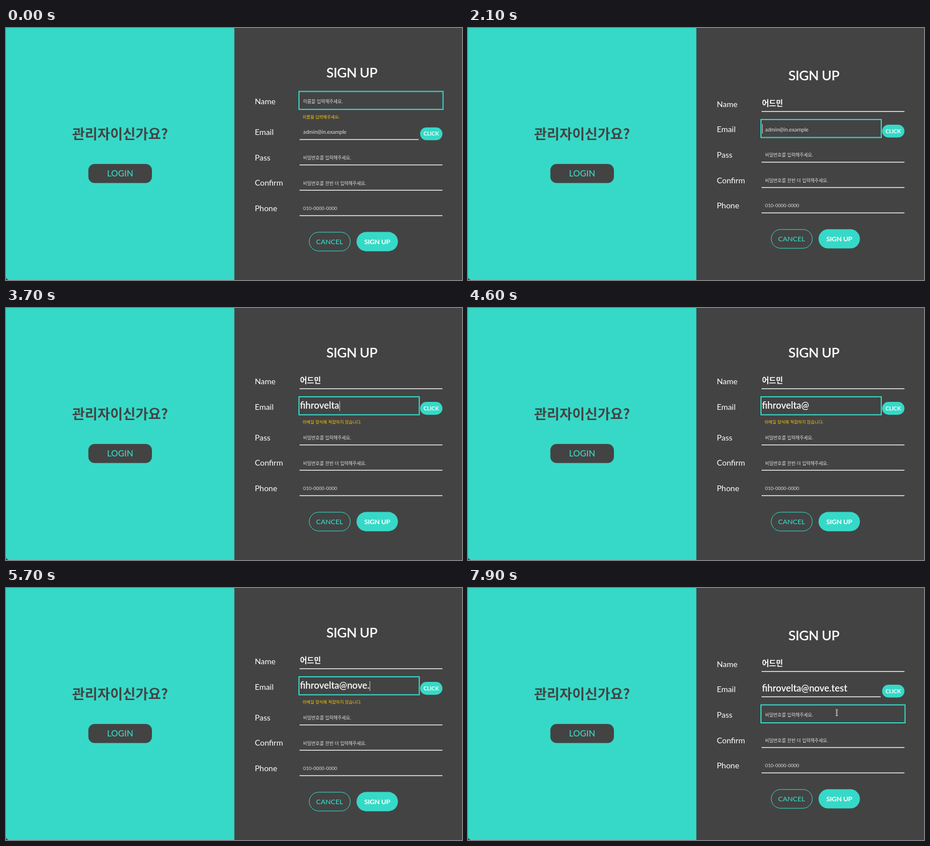
Recreate the animation shown at these times as an HTML page. Size 800 px wide and 443 px high, loop 8000 ms.

```html
<!DOCTYPE html>
<html lang="ko">
<head>
<meta charset="utf-8">
<title>Sign up</title>
<style>
  :root { --teal: #36d9c7; --dark: #434343; }
  html, body { margin: 0; width: 100%; height: 100%; overflow: hidden; background: var(--dark); }
  svg { display: block; width: 100%; height: 100%; }
  text { font-family: Lato, "Noto Sans CJK KR", "Noto Sans CJK", sans-serif; fill: #fff; white-space: pre; }
  .ko { font-family: "Noto Sans CJK KR", "Noto Sans CJK", sans-serif; }
  .mid { text-anchor: middle; }
  .ask { font-size: 24.2px; font-weight: 700; fill: var(--dark); }
  .title { font-size: 23.6px; font-weight: 600; letter-spacing: -.45px; }
  .login { font-size: 15px; font-weight: 500; fill: var(--teal); }
  .cancel { font-size: 12.1px; font-weight: 500; letter-spacing: .1px; fill: var(--teal); }
  .submit { font-size: 12px; font-weight: 700; letter-spacing: -.25px; }
  .click { font-size: 9.5px; font-weight: 700; }
  .label { font-size: 14px; }
  .hint { font-size: 7.92px; fill: #dedede; }
  .hint.latin { font-size: 8.4px; }
  .hint.mail { font-size: 9.25px; }
  .value { font-size: 16.4px; font-weight: 600; }
  .value.ko { font-size: 13.4px; font-weight: 700; }
  .error { font-size: 7.4px; font-weight: 500; fill: #ffc800; }
  .line { fill: #f4f4f4; }
  .box { fill: none; stroke: var(--teal); stroke-width: 1.9; }
</style>
</head>
<body>
<svg viewBox="0 0 800 443" preserveAspectRatio="none">
  <rect width="800" height="443" fill="#434343"/>
  <rect width="400.6" height="443" fill="#36d9c7"/>
  <path d="M0 438Q1 442 5 443H0Z" fill="#434343"/>
  <text class="ask ko mid" x="200" y="195">관리자이신가요?</text>
  <rect x="144.5" y="239" width="111.5" height="33.4" rx="11" fill="#434343"/>
  <text class="login mid" x="200.3" y="261.2">LOGIN</text>

  <g id="head"><text class="title mid" x="606.8" y="92.3">SIGN UP</text></g>
  <g id="rows"></g>
  <g id="foot">
    <rect x="532" y="354.2" width="72" height="33" rx="16.5" fill="none" stroke="#36d9c7"/>
    <text class="cancel mid" x="567.7" y="375.2">CANCEL</text>
    <rect x="615" y="353.8" width="72.6" height="33.8" rx="16.9" fill="#36d9c7"/>
    <text class="submit mid" x="651.2" y="375.2">SIGN UP</text>
  </g>

  <g id="hand" stroke="#333" stroke-width=".7" stroke-linejoin="round">
    <path d="M-1.6 -4.6Q-.8 -5.4 0 -4.6V-1.6L3.2 -.9Q4.4 -.4 4.2 .8L3.5 4.5H-1.4L-4 1.2Q-4.2 0 -2.9 .3L-1.6 1.3Z" fill="#fff"/>
    <path d="M.2 1.2V3M1.6 1.2V3" fill="none"/>
  </g>
  <g id="beam" fill="none">
    <path d="M-2 -5Q0 -5 0 -3.8Q0 -5 2 -5M0 -3.8V3.8M-2 5Q0 5 0 3.8Q0 5 2 5" stroke="#eee" stroke-width="2.2"/>
    <path d="M-2 -5Q0 -5 0 -3.8Q0 -5 2 -5M0 -3.8V3.8M-2 5Q0 5 0 3.8Q0 5 2 5" stroke="#333" stroke-width=".8"/>
  </g>
</svg>
<script>
const LOOP = 8000, STEP = 100, SHIFT = 4.8;
const $ = id => document.getElementById(id);

function add(parent, tag, attrs, content = "") {
  const el = document.createElementNS("http://www.w3.org/2000/svg", tag);
  for (const key in attrs) el.setAttribute(key, attrs[key]);
  el.textContent = content;
  parent.append(el);
  return el;
}
const show = (el, on) => el.setAttribute("visibility", on ? "visible" : "hidden");
const place = (el, x, y) => el.setAttribute("transform", `translate(${x} ${y})`);

const fields = [
  { label: "Name", hint: "이름을 입력해주세요.", font: "ko", error: "이름을 입력해주세요." },
  { label: "Email", hint: "admin@in.example", font: "latin mail", right: 724, error: "이메일 형식에 적합하지 않습니다." },
  { label: "Pass", hint: "비밀번호를 입력해주세요.", font: "ko" },
  { label: "Confirm", hint: "비밀번호를 한번 더 입력해주세요.", font: "ko" },
  { label: "Phone", hint: "010-0000-0000", font: "latin" }
];

// Each row is drawn with its underline at y = 0.
const rows = fields.map((f, i) => {
  const g = add($("rows"), "g", {});
  const right = f.right || 765.7;
  add(g, "text", { class: "label", x: 436.5, y: -7.9 }, f.label);
  if (i === 1) {
    add(g, "rect", { x: 726.5, y: -21.4, width: 39.2, height: 22.6, rx: 11.3, fill: "#36d9c7" });
    add(g, "text", { class: "click mid", x: 746, y: -6.6 }, "CLICK");
  }
  return {
    g,
    y: 146.7 + 44.58 * i,
    line: add(g, "rect", { class: "line", x: 515, y: -.7, width: right - 515, height: 1.4 }),
    box: add(g, "rect", { class: "box", x: 514, y: -30.4, width: right - 513, height: 31.6 }),
    hint: add(g, "text", { class: "hint " + f.font, x: 521.3, y: -9.7 }, f.hint),
    value: add(g, "text", { class: "value " + f.font, x: 515.7, y: i ? -9.3 : -10.2 }),
    error: add(g, "text", { class: "error ko", x: 520.3, y: 16.9 }, f.error),
    caret: add(g, "rect", { y: -22.6, width: .9, height: 17, fill: "#ddd" })
  };
});

const nameSteps = ["ㅇ", "어", "얻", "어드", "어듬", "어드미", "어드민"];
const nameTimes = [200, 300, 500, 600, 800, 900, 1200];
const mail = "fihrovelta@nove.test";
const mailTimes = [2400, 2500, 2700, 2900, 3000, 3200, 3300, 3400, 3500, 3600, 4000,
  4800, 5000, 5200, 5300, 5700, 5800, 5900, 6000, 6200];
const mailFocus = 2000, passFocus = 7400;
const keyMoments = [-500, ...nameTimes, mailFocus, ...mailTimes, passFocus];
const countTo = (times, t) => times.filter(k => k <= t).length;

function drawCursor(t) {
  const ease = (a, b) => {
    const p = Math.min(1, Math.max(0, (t - a) / (b - a)));
    return p * p * (3 - 2 * p);
  };
  const arrive = ease(6300, 6600), leave = ease(7200, 7400);
  const x = 732 + 12 * arrive - 97 * leave;
  const y = 187 - 5 * arrive + 37 * leave;
  const onButton = x > 726;
  show($("hand"), t >= 6400 && onButton);
  show($("beam"), t >= 6400 && !onButton);
  place($("hand"), x, y);
  place($("beam"), x, y);
}

function draw(t) {
  const typed = [
    nameSteps[countTo(nameTimes, t) - 1] || "",
    mail.slice(0, countTo(mailTimes, t)), "", "", ""
  ];
  const focus = t < mailFocus ? 0 : t < passFocus ? 1 : 2;
  const badMail = typed[1] && !/@\w+(\.\w+)?$/.test(typed[1]);
  const bad = !typed[0] ? 0 : badMail ? 1 : -1;
  const since = t - Math.max(...keyMoments.filter(k => k <= t));
  const caretOn = since % 1000 < 500;

  rows.forEach((r, i) => {
    const active = i === focus;
    place(r.g, 0, r.y + (bad < 0 ? 0 : i <= bad ? -SHIFT : SHIFT));
    r.value.textContent = typed[i];
    show(r.line, !active);
    show(r.box, active);
    show(r.hint, !typed[i]);
    show(r.error, i === bad);
    show(r.caret, active && caretOn);
    if (active) r.caret.setAttribute("x", 516 + (typed[i] ? r.value.getComputedTextLength() : 0));
  });
  place($("head"), 0, bad < 0 ? 0 : -SHIFT);
  place($("foot"), 0, bad < 0 ? 0 : SHIFT);
  drawCursor(t);
}

const start = performance.now();
function tick() {
  const t = (performance.now() - start) % LOOP;
  draw(Math.floor(t / STEP) * STEP);
  requestAnimationFrame(tick);
}
tick();
</script>
</body>
</html>
```
